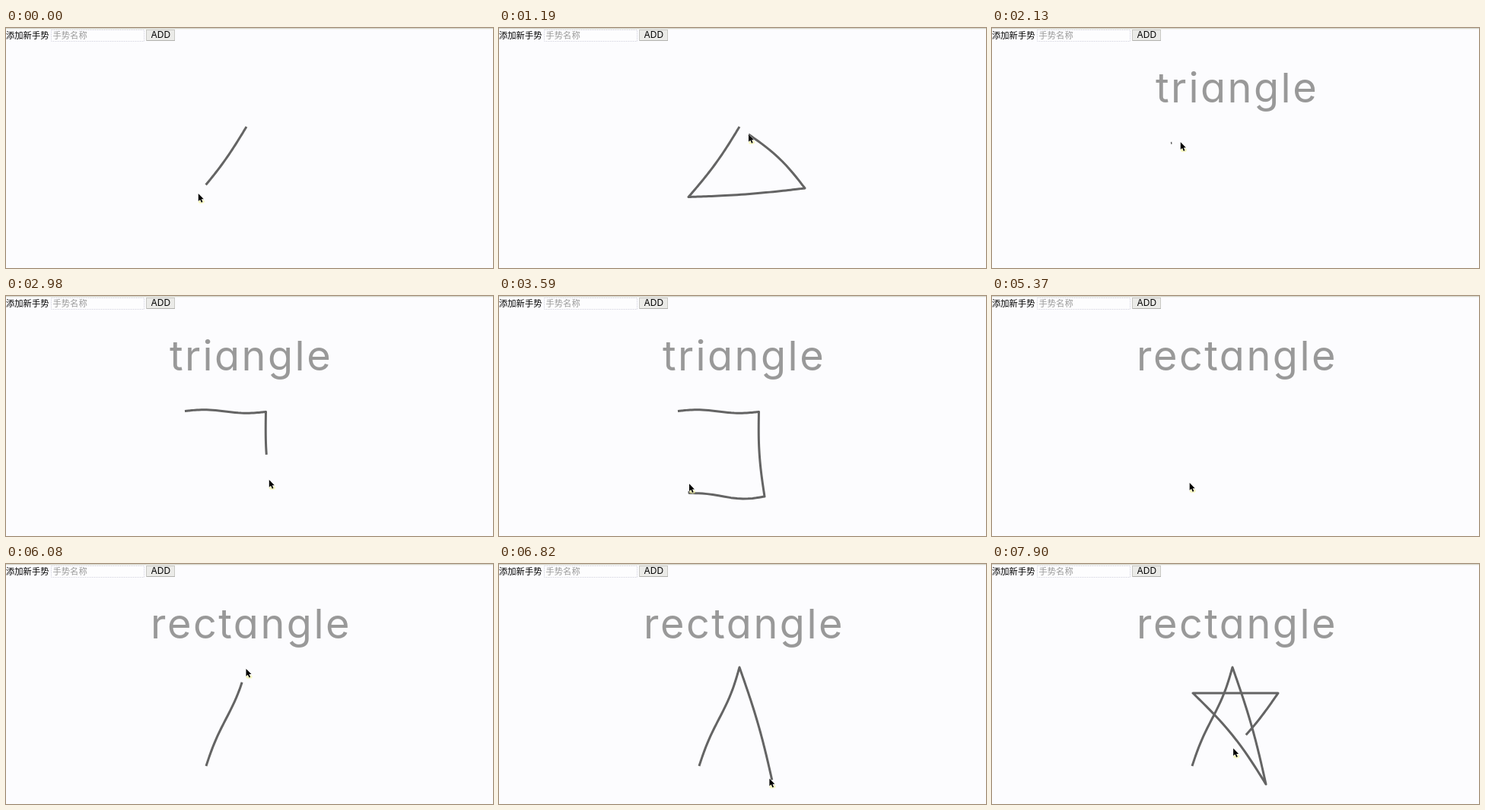
An HTML page for the animation above (8000 ms loop, 640x316 px).

```html
<!DOCTYPE html>
<html lang="zh">
<head>
<meta charset="utf-8">
<title>Gesture drawing</title>
<style>
  html, body { margin: 0; width: 100%; height: 100%; overflow: hidden; background: #fcfcfe; }
  svg { display: block; width: 640px; height: 316px; }
  .cjk { font: 11.3px "Noto Sans CJK SC", "Noto Sans CJK", sans-serif; }
  .button { font: 12px Inter, sans-serif; }
  #title {
    font: 400 54px Inter, sans-serif;
    font-feature-settings: "cv11";
    letter-spacing: 2.5px;
    text-anchor: middle;
    fill: #999;
  }
  #line { fill: none; stroke: #646464; stroke-width: 3; stroke-linejoin: round; }
</style>
</head>
<body>
<svg viewBox="0 0 640 316">
  <path d="M0 .5H640" stroke="#d4d4cc"/>
  <path d="M0 1.5H640" stroke="#f3f3ee"/>
  <text class="cjk" x="0" y="13.5">添加新手势</text>
  <rect x="59.5" y="2.5" width="122" height="15" fill="#fdfdfe" stroke="#dcdce6" stroke-dasharray="2 1"/>
  <text class="cjk" x="61.5" y="13.5" fill="#999">手势名称</text>
  <rect x="184.5" y="2.5" width="37" height="14" fill="#ebebe8" stroke="#c8c8c4"/>
  <path d="M185 16.5H222" stroke="#b0b0ac"/>
  <text class="button" x="190.5" y="13">ADD</text>
  <text id="title" x="322" y="98"></text>
  <path id="line"/>
  <g id="cursor">
    <ellipse cx="4" cy="10.5" rx="4" ry="2.5" fill="#f4f4a0" opacity=".7"/>
    <path d="M0 0V9.8L2.3 7.8 4 11.7 5.7 11 4 7.2H7Z" stroke="#fff" stroke-width=".8" paint-order="stroke"/>
  </g>
</svg>
<script>
const LOOP = 8000;
const LAG = 110;  // the line trails the pointer
const STEP = 15;  // sampling of the line, ms
const REST = 200; // pause after a stroke

// A corner with its arrival time; bow and wave bend the side that leads to it.
const corner = (time, x, y, bow = 0, wave = 0) => ({ time, x, y, bow, wave });

const strokes = [
  { clear: 1450, title: "triangle", corners: [
    corner(-590, 316, 130),
    corner(80, 249, 222.5, -3),
    corner(760, 402, 211, 2),
    corner(1080, 328, 140, 5)
  ] },
  { clear: 4560, title: "rectangle", corners: [
    corner(2000, 235, 151.5),
    corner(2600, 341.5, 152.5, 0, -2),
    corner(3140, 349, 264, 3),
    corner(3430, 250, 259.5, -3, -2),
    corner(4200, 244, 151, 2)
  ] },
  { clear: LOOP, corners: [
    corner(5575, 263, 266),
    corner(6100, 316, 136, 1, -2),
    corner(6770, 360, 290, -3),
    corner(7165, 264, 170, 6),
    corner(7440, 376, 170),
    corner(8030, 308, 252, -3)
  ] }
];

const startOf = stroke => stroke.corners[0];
const endOf = stroke => stroke.corners[stroke.corners.length - 1];
const clamp = u => Math.min(1, Math.max(0, u));

function side(a, b, t) {
  const time = clamp((t - a.time) / (b.time - a.time));
  const u = time - 0.1 * Math.sin(2 * Math.PI * time); // slower near corners
  const dx = b.x - a.x, dy = b.y - a.y;
  const bend = (b.bow * Math.sin(Math.PI * u) + b.wave * Math.sin(2 * Math.PI * u)) / Math.hypot(dx, dy);
  return [a.x + dx * u - dy * bend, a.y + dy * u + dx * bend];
}

function pointAt({ corners }, t) {
  const next = corners.findIndex((c, i) => i > 0 && c.time >= t);
  const i = next < 0 ? corners.length - 1 : next;
  return side(corners[i - 1], corners[i], t);
}

function pointer(t) {
  const i = strokes.findIndex(s => t <= endOf(s).time);
  const to = startOf(strokes[i]);
  if (t >= to.time) return pointAt(strokes[i], t);
  const from = endOf(strokes[i - 1]);
  const u = clamp((t - from.time - REST) / (to.time - from.time - REST));
  return [from.x + (to.x - from.x) * u, from.y + (to.y - from.y) * u];
}

function lineAt(t) {
  const stroke = strokes.find(s => t < s.clear);
  const tip = Math.min(t - LAG, endOf(stroke).time);
  const start = startOf(stroke).time;
  if (tip <= start) return "";
  const times = stroke.corners.map(c => c.time).filter(c => c < tip);
  for (let time = start; time < tip; time += STEP) times.push(time);
  times.push(tip);
  times.sort((a, b) => a - b);
  return "M" + times.map(time => pointAt(stroke, time).map(v => v.toFixed(2)).join(" ")).join("L");
}

const [title, line, cursor] = ["title", "line", "cursor"].map(id => document.getElementById(id));

function draw() {
  const t = performance.now() % LOOP;
  const done = strokes.filter(s => s.clear <= t).pop();
  const [x, y] = pointer(t);
  title.textContent = done ? done.title : "";
  line.setAttribute("d", lineAt(t));
  cursor.setAttribute("transform", `translate(${x.toFixed(1)} ${y.toFixed(1)})`);
  requestAnimationFrame(draw);
}
draw();
</script>
</body>
</html>
```
